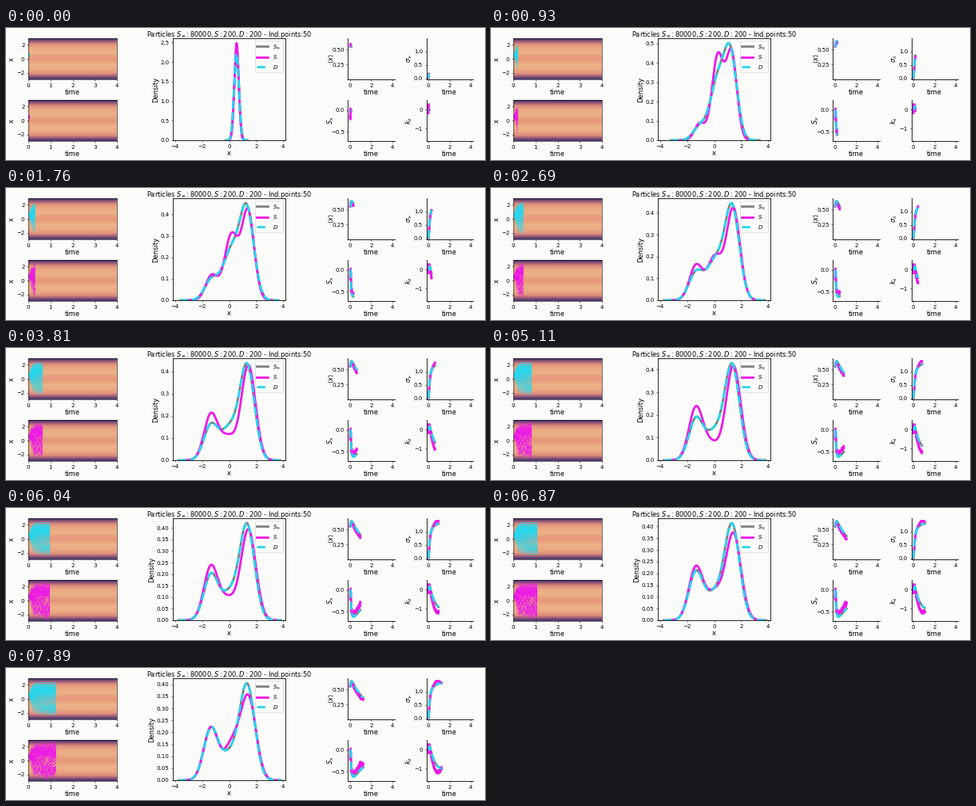
A matplotlib script that plays this animation: 600 by 167 pixels, repeating every 7.99 s.

```python
import numpy as np
import matplotlib.pyplot as plt
from matplotlib.animation import FuncAnimation
from matplotlib.colors import LinearSegmentedColormap

W, H, DPI = 600, 167, 50
FRAMES, LOOP = 86, 7990
T0, T1 = 0.04, 1.247
PAPER, GRAY, PINK, CYAN = "#fbfcf9", "#7f7f7f", "#ee18ea", "#22d8f0"

plt.rcParams.update({
    "font.family": "DejaVu Sans", "mathtext.fontset": "dejavusans",
    "font.size": 10, "axes.labelsize": 12, "axes.titlesize": 11.9,
    "axes.labelpad": 2, "axes.linewidth": 1.2,
    "xtick.major.pad": 3, "ytick.major.pad": 3,
    "figure.facecolor": PAPER, "axes.facecolor": PAPER,
})


def settle(t, tau):
    return 1 - np.exp(-max(t - T0, 0) / tau)


def bumps(t, sampled):
    """Weights, centres and widths of the left, middle and right bumps."""
    e = settle(t, 0.075)
    left = 0.33 * (1 - np.exp(-t / 0.62))
    mid = 0.14 + 0.45 * np.exp(-t / 0.33)
    weight = np.array([left, mid, 1 - left - mid])
    centre = 0.55 + np.array([-1.9 * e, -0.55 * settle(t, 0.17), 0.78 * e])
    width = np.array([0.53, 0.6, 0.525 + 0.035 * t])
    start = 0.18
    if sampled:
        wave = np.cos(2 * np.pi * (t - 0.18) / 1.15)
        weight = weight * [1, 1, 0.91] + [0.03 * (1 - wave), 0.08 * wave,
                                          -0.04 * wave]
        centre = centre + [0, 0.2 * wave * t, 0.1 * e]
        width = width * (1 - 0.35 * np.exp(-t / 0.3))
        start = 0.16
    start *= np.clip(t / T0, 0.1, 1)
    return weight, centre, start + (width - start) * e


def density(t, x, sampled):
    w, m, s = bumps(t, sampled)
    z = (x[:, None] - m) / s
    return (w * np.exp(-z * z / 2) / (s * np.sqrt(2 * np.pi))).sum(axis=1)


def span(t, sampled):
    _, m, s = bumps(t, sampled)
    reach = 3.8 if sampled else 4.5
    return np.linspace(m[0] - reach * s[0], m[2] + reach * s[2], 300)


grid = np.linspace(-4, 4, 1201)


def quantiles(t, ranks, sampled):
    cdf = np.cumsum(density(t, grid, sampled))
    return np.interp(ranks, cdf / cdf[-1], grid)


def moments(t, sampled):
    """Mean, deviation, skewness and excess kurtosis."""
    p = density(t, grid, sampled)
    p /= p.sum()
    mean = p @ grid
    d = grid - mean
    std = np.sqrt(p @ d**2)
    return mean, std, p @ d**3 / std**3, p @ d**4 / std**4 - 3


fig = plt.figure(figsize=(W / DPI, H / DPI), dpi=DPI)
rng = np.random.default_rng(4)


def panel(x0, y0, x1, y1):
    return fig.add_axes([x0 / W, 1 - y1 / H, (x1 - x0) / W, (y1 - y0) / H])


def trio(ax):
    styles = [(GRAY, "-", r"$S_\infty$"), (PINK, "-", "$S$"), (CYAN, "--", "$D$")]
    return [ax.plot([], [], ls, color=c, lw=4, label=name)[0]
            for c, ls, name in styles]


# Particle clouds over the drift background
half = [(0, "#43366a"), (.04, "#6b4674"), (.09, "#b26a78"), (.14, "#dc8f7c"),
        (.22, "#eaa582"), (.34, "#ecb287"), (.43, "#e9a27f"), (.5, "#e6957a")]
heat = LinearSegmentedColormap.from_list(
    "heat", half + [(1 - v, c) for v, c in half[-2::-1]])
cloud_t = np.linspace(0, T1, FRAMES + 3)


def cloud(y0, ranks, color, sampled):
    ax = panel(28, y0, 139, y0 + 52)
    ax.spines[:].set_linewidth(0.8)
    ax.imshow(np.linspace(0, 1, 256)[:, None], cmap=heat, aspect="auto",
              extent=(0, 4, -2.9, 2.9), origin="lower")
    ax.set(xlim=(0, 4), ylim=(-2.9, 2.9), xticks=range(5), yticks=[-2, 0, 2],
           xlabel="time", ylabel="x")
    dots, = ax.plot([], [], "o", ms=1.5, mew=0, color=color, alpha=.5)
    return dots, np.array([quantiles(t, u, sampled)
                           for t, u in zip(cloud_t, ranks)])


steady = np.tile(np.linspace(.02, .98, 50), (len(cloud_t), 1))
walk = np.linspace(0, 1, 67) + np.cumsum(
    rng.normal(0, .05, (len(cloud_t), 67)), axis=0)
folded = 1 - np.abs(walk % 2 - 1)
clouds = [cloud(13, steady, CYAN, False), cloud(91, folded, PINK, True)]

# Density plot
main = panel(209, 13, 350, 142)
main.set(xlim=(-4.17, 4.17), xticks=range(-4, 5, 2), xlabel="x",
         ylabel="Density")
main.set_title(r"Particles $S_\infty:80000, S:200, D:200$ - Ind.points:50",
               pad=3.5, y=1.0)
curves = trio(main)
main.legend(loc="upper right")

# Moment plots
moment_t = np.linspace(0, T1, 260)
exact, sampled = (np.array([moments(t, s) for t in moment_t]).T
                  for s in (False, True))
shake = 1 + 6 * np.exp(-moment_t / .05)


def moment(k, x0, y0, ylim, ticks, label, noise):
    ax = panel(x0, y0, x0 + 58, y0 + 52)
    ax.spines[["top", "right"]].set_visible(False)
    ax.set(xlim=(-.2, 4.2), ylim=ylim, xticks=[0, 2, 4], yticks=ticks,
           xlabel="time", ylabel=label)
    ax.yaxis.set_label_coords(-.27, .5)
    jitter = np.convolve(rng.normal(0, noise, 260), np.ones(4) / 2, "same")
    return trio(ax), (exact[k], sampled[k] + jitter * shake, exact[k])


stats = [
    moment(0, 428.5, 13, (.01, .684), [.25, .5], r"$\langle x \rangle$", .006),
    moment(1, 526.5, 13, (-.03, 1.48), [0, .5, 1], r"$\sigma_x$", .005),
    moment(2, 428.5, 91, (-.72, .24), [-.5, 0], "$S_x$", .02),
    moment(3, 526.5, 91, (-1.65, .5), [-1, 0], "$k_x$", .04),
]


def update(i):
    t = T0 + (T1 - T0) * i / (FRAMES - 1)
    top = 0
    for line, noisy in zip(curves, (False, True, False)):
        x = span(t, noisy)
        y = density(t, x, noisy)
        line.set_data(x, y)
        top = max(top, y.max())
    main.set_ylim(0, 1.05 * top)

    n = np.searchsorted(cloud_t, t, "right")
    for dots, paths in clouds:
        dots.set_data(np.repeat(cloud_t[:n], paths.shape[1]), paths[:n].ravel())

    n = np.searchsorted(moment_t, t, "right")
    for lines, values in stats:
        for line, y in zip(lines, values):
            line.set_data(moment_t[:n], y[:n])
    return []


anim = FuncAnimation(fig, update, frames=FRAMES, interval=LOOP / FRAMES,
                     init_func=lambda: update(0), repeat=True, repeat_delay=0)
plt.show()
```
